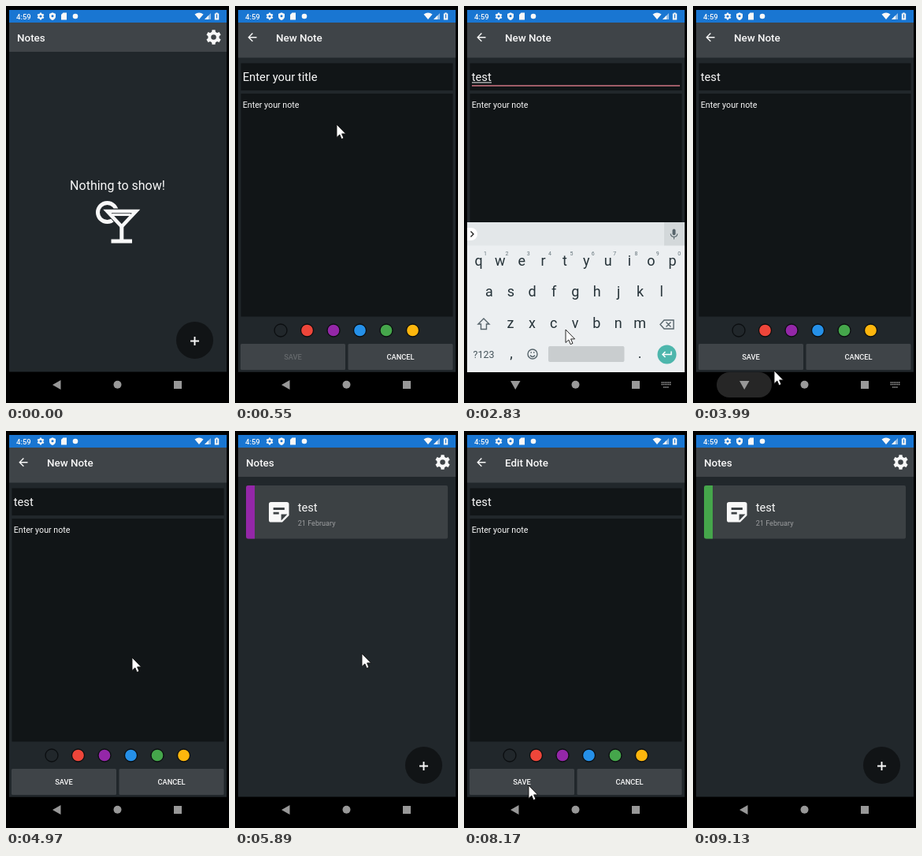
Recreate the animation shown at these times as an HTML page. Size 283 by 503 pixels, loop 9.38 s.

```html
<!DOCTYPE html>
<html lang="en">
<head>
<meta charset="utf-8">
<title>Notes app</title>
<style>
html, body { margin: 0; width: 100%; height: 100%; overflow: hidden; background: #000; }
svg { display: block; width: 100vw; height: 100vh; font-family: Roboto, sans-serif; fill: #f8f8f8; }
.bold { font-weight: 500; }
.mid { text-anchor: middle; }
.field { fill: #111517; }
.button { fill: #3f4448; }
.fab { fill: #111416; }
.key { fill: #253238; font-size: 18px; text-anchor: middle; }
.hint { fill: #66757c; font-size: 7px; text-anchor: middle; }
.line { fill: none; stroke: #56646b; stroke-width: 1.4; }
</style>
</head>
<body>
<svg viewBox="0 0 283 503">
  <defs>
    <g id="gear">
      <circle r="5.2" fill="none" stroke="#f8f8f8" stroke-width="3.8"/>
      <path id="tooth" d="M-2.5-6 -2-9.3H2L2.5-6Z"/>
      <use href="#tooth" transform="rotate(60)"/><use href="#tooth" transform="rotate(120)"/>
      <use href="#tooth" transform="rotate(180)"/><use href="#tooth" transform="rotate(240)"/>
      <use href="#tooth" transform="rotate(300)"/>
    </g>
  </defs>
  <rect width="283" height="503" fill="#000"/>
  <rect x="4" y="5" width="276" height="458.500" fill="#21272b"/>

  <g id="statusBar">
    <rect x="4" y="5" width="276" height="16" fill="#1976d2"/>
    <text x="13" y="16.500" font-size="9.5" class="bold">4:59</text>
    <use href="#gear" transform="translate(44 13) scale(.48)"/>
    <path d="M59 8.300 63 10V13Q63 16.500 59 18 55 16.500 55 13V10Z"/>
    <circle cx="59" cy="12.800" r="1.500" fill="#1976d2"/>
    <path d="M72.500 8.500H77V17.500H70V11Z"/>
    <circle cx="88" cy="13" r="3.300"/>
    <path d="M239.500 10.500Q245 6.500 250.500 10.500L245 17Z"/>
    <path d="M252 17 260 9V17Z" opacity=".55"/><path d="M252 17 257 12V17Z"/>
    <path d="M264.800 9.500H266.300V8.500H268.700V9.500H270.200V17.500H264.800Z"/>
    <path d="M267.500 10.500V15.500" stroke="#1976d2" stroke-width="1.200"/>
  </g>

  <rect x="4" y="21" width="276" height="37" fill="#3f4448"/>
  <g id="homeHeader">
    <text x="14" y="45" font-size="13.400" class="bold">Notes</text>
    <use href="#gear" x="263.500" y="39.500"/>
  </g>
  <g id="formHeader">
    <path transform="translate(13.500 31.300) scale(.7)" d="M20 11H7.830l5.590-5.590L12 4l-8 8 8 8 1.410-1.410L7.830 13H20Z"/>
    <text id="heading" x="52" y="45" font-size="13.400" class="bold"></text>
  </g>

  <g id="empty">
    <text x="141.500" y="233" font-size="16" class="mid">Nothing to show!</text>
    <circle cx="128.500" cy="261.500" r="12" fill="none" stroke="#f8f8f8" stroke-width="5"/>
    <path d="M125 258H169L147 283Z" fill="#21272b" stroke="#21272b" stroke-width="3"/>
    <path d="M128.500 260H165L146.800 279.500Z" fill="none" stroke="#f8f8f8" stroke-width="4.600"/>
    <path d="M135 264.500H158" stroke="#f8f8f8" stroke-width="3"/>
    <path d="M146.800 279V298M133.500 298H160" stroke="#f8f8f8" stroke-width="5"/>
  </g>

  <g id="card">
    <rect x="14" y="69" width="256" height="67.500" rx="2" fill="#3c4144"/>
    <path id="stripe" d="M25 69V136.500H17Q14 136.500 14 133.500V72Q14 69 17 69Z"/>
    <path transform="translate(38.700 85.700) scale(1.420)" d="M19 3H5Q3 3 3 5V19Q3 21 5 21H15l6-6V5Q21 3 19 3ZM7 8h10v2H7Zm5 6H7v-2h5Zm2 5.500V14h5.500Z"/>
    <text x="79.700" y="102" font-size="14.700">test</text>
    <text x="79.700" y="120" font-size="9.100" fill="#9b9d9f">21 February</text>
    <rect id="selection" x="12.200" y="66.800" width="259.500" height="71" fill="none" stroke="#dc720f" stroke-width="3.500"/>
  </g>

  <g id="fabs">
    <g id="editFab">
      <circle cx="239.500" cy="365.500" r="23.500" class="fab"/>
      <circle id="editRipple" cx="239.500" cy="365.500" r="23.500" opacity=".16"/>
      <path transform="translate(230.800 357) scale(.72)" d="M3 17.250V21h3.750L17.810 9.940l-3.750-3.750ZM20.710 7.040q.7-.7 0-1.410l-2.340-2.340q-.7-.7-1.410 0l-1.830 1.830 3.750 3.750Z"/>
    </g>
    <circle cx="239.500" cy="423.500" r="23.500" class="fab"/>
    <circle id="addRipple" cx="239.500" cy="423.500" r="23.500" opacity=".12"/>
    <path d="M234 424.500H245M239.500 419V430" stroke="#f8f8f8" stroke-width="1.900"/>
  </g>

  <g id="form">
    <rect x="4" y="58" width="276" height="405.500" fill="#21272b"/>
    <rect x="4" y="57.500" width="276" height="8" fill="#3f4448"/>
    <rect x="7.500" y="72.500" width="269" height="34.500" class="field"/>
    <rect x="7.500" y="111" width="269" height="282.500" class="field"/>
    <text id="title" x="9.700" y="95" font-size="14.800"></text>
    <path id="composing" d="M10 97H35" stroke="#f8f8f8"/>
    <path id="focusLine" d="M10 101H274" stroke="#cf7482" stroke-width="1.300"/>
    <path id="caret" d="M35.500 79V99" stroke="#cf7482" stroke-width="1.400"/>
    <text x="9.700" y="129" font-size="10.700">Enter your note</text>
    <g id="swatches" stroke="#0b0e10" stroke-width="1.300"></g>
    <rect x="7" y="428" width="133" height="33" rx="1.500" class="button"/>
    <rect id="saveRipple" x="7" y="428" width="133" height="33" rx="1.500" opacity=".15"/>
    <rect x="143.500" y="428" width="133" height="33" rx="1.500" class="button"/>
    <text id="save" x="73.500" y="448" font-size="9.300" class="bold mid">SAVE</text>
    <text x="210" y="448" font-size="9.300" class="bold mid">CANCEL</text>
  </g>

  <g id="keyboard">
    <rect x="4" y="274" width="276" height="190" fill="#eceff1"/>
    <rect x="4" y="274" width="276" height="29.500" fill="#e3e7e9"/>
    <rect x="254" y="274" width="26" height="29.500" fill="#d3d8da"/>
    <path d="M4 281H9A8 8 0 0 1 9 297H4Z" fill="#fff"/>
    <path d="M8.500 285.500 12 289 8.500 292.500" class="line" style="stroke:#222"/>
    <rect x="264.500" y="282.500" width="4" height="8" rx="2" fill="#56646b"/>
    <path d="M262.200 288.500Q262.500 292.500 266.500 292.500T270.800 288.500M266.500 292.500V295.500" class="line" style="stroke-width:1.100"/>
    <path d="M25 396 32 403H28.500V409.500H21.500V403H18Z" class="line"/>
    <path d="M254 398H266V409H254L249 403.500ZM256.500 400.500 262.500 406.500M262.500 400.500 256.500 406.500" class="line"/>
    <circle cx="87" cy="441" r="6" class="line"/>
    <path d="M84 442.500Q87 446.500 90 442.500M84.500 439H86M88 439H89.500" class="line"/>
    <rect x="107" y="431" width="96.500" height="20" rx="2" fill="#c9cdcf"/>
    <text x="25" y="445.500" class="key" style="font-size:12.500px;fill:#45545b">?123</text>
    <text x="60" y="446" class="key">,</text>
    <text x="223" y="446" class="key">.</text>
    <circle cx="257.500" cy="441.500" r="12" fill="#4db6ac"/>
    <path d="M263 437.500V441.500H252.500M255.500 438 252 441.500 255.500 445" fill="none" stroke="#fff" stroke-width="1.500"/>
  </g>

  <g id="navBar" fill="#989898">
    <rect id="navRipple" x="30" y="464" width="70" height="32" rx="16" fill="#262626"/>
    <path id="navBack" d="M59 480 69.500 474V486Z"/>
    <path id="navDown" d="M59 475H71.500L65.200 486Z"/>
    <circle cx="141.500" cy="479.800" r="5"/>
    <rect x="213" y="475" width="10" height="10"/>
    <path id="navKeys" d="M250.500 477H262.500M250.500 479.500H262.500M253 483H260" stroke="#989898" stroke-width="1.400" stroke-dasharray="1.500 .6"/>
  </g>
  <path id="pointer" d="M0 0V16.500L3.800 13 6.200 18.600 9 17.400 6.600 11.900H11.600Z" fill="#fff" stroke="#111" stroke-width=".9"/>
</svg>
<script>
const LOOP = 9380;
const PURPLE = '#9427a8', GREEN = '#45a64b';
const el = {};
document.querySelectorAll('[id]').forEach(node => el[node.id] = node);

// Swatches and letter keys
['#21272b', '#ee463a', PURPLE, '#2590e8', GREEN, '#fdb60d'].forEach((color, i) => {
  el.swatches.innerHTML += `<circle cx="${58 + 33.5 * i}" cy="411" r="8" fill="${color}"/>`;
});
[['qwertyuiop', 18.5, 329], ['asdfghjkl', 32, 368], ['zxcvbnm', 59, 408]].forEach(([letters, x0, y], row) => {
  [...letters].forEach((letter, i) => {
    const x = x0 + 27.35 * i;
    el.keyboard.innerHTML += `<text x="${x}" y="${y}" class="key">${letter}</text>`;
    if (!row) el.keyboard.innerHTML += `<text x="${x + 8.5}" y="315.500" class="hint">${(i + 1) % 10}</text>`;
  });
});

// [time, x, y, glide]: without glide the pointer holds, then jumps
const path = [
  [20, 205, 492], [300, 237, 423, 1], [550, 129, 150], [720, 129, 150], [960, 100, 90, 1],
  [2210, 100, 90], [2400, 131, 270, 1], [2580, 129, 410, 1], [3030, 223, 400], [3340, 223, 400],
  [3520, 255, 474, 1], [3760, 66, 475, 1], [3900, 66, 475], [3990, 103, 462, 1], [4220, 123, 409, 1],
  [4630, 110, 425], [4740, 80, 447, 1], [4970, 160, 287], [5200, 161, 282], [6170, 161, 282],
  [6380, 150, 110, 1], [6560, 150, 110], [6830, 234, 362, 1], [7270, 160, 269], [7720, 160, 269],
  [7920, 191, 410, 1], [7990, 191, 410], [8170, 82, 449, 1], [8360, 82, 449], [8450, 153, 266],
  [8890, 154, 260], [9130, 225, 504, 1]
];

const within = (t, from, to) => t >= from && t < to;
const ramp = (t, from, to) => Math.min(1, Math.max(0, (t - from) / (to - from)));
const show = (id, visible) => el[id].style.display = visible ? '' : 'none';

function placePointer(t) {
  show('pointer', within(t, 20, 9130));
  const next = path.findIndex(point => point[0] > t);
  if (next < 1) return;
  const [t0, x0, y0] = path[next - 1], [t1, x1, y1, glide] = path[next];
  const p = glide ? ramp(t, t0, t1) : 0, ease = p * p * (3 - 2 * p);
  el.pointer.setAttribute('transform', `translate(${x0 + (x1 - x0) * ease} ${y0 + (y1 - y0) * ease})`);
}

function draw(t) {
  const creating = within(t, 360, 5870), editing = within(t, 7270, 8590);
  show('homeHeader', !creating && !editing);
  show('formHeader', creating || editing);
  el.heading.textContent = creating ? 'New Note' : 'Edit Note';

  show('empty', t < 550);
  show('card', t >= 5870);
  el.stripe.setAttribute('fill', t < 8000 ? PURPLE : GREEN);
  show('selection', within(t, 6540, 7720));
  show('addRipple', within(t, 300, 550));
  show('editFab', within(t, 6580, 7720));
  show('editRipple', within(t, 7000, 7270));
  const rise = ramp(t, 6580, 6800);
  el.editFab.setAttribute('transform', `translate(0 ${58 * (1 - rise) ** 2})`);

  show('form', within(t, 550, 5870) || within(t, 7520, 8660));
  el.form.style.opacity = t < 5380 ? 1 : t < 5870 ? .5 : t < 7720 ? .7 : 1 - ramp(t, 8590, 8660);
  el.title.textContent = t < 1000 ? 'Enter your title' : t < 1370 ? 't' : 'test';
  show('focusLine', within(t, 960, 3940));
  show('composing', within(t, 1370, 3940));
  show('caret', within(t, 1370, 3940) && (t < 2210 || Math.floor((t - 1030) / 500) % 2 === 0));
  el.save.style.opacity = t < 1000 ? .2 : 1;
  show('saveRipple', within(t, 4740, 4970) || within(t, 8360, 8450));

  show('keyboard', within(t, 2830, 3940));
  const typing = within(t, 1370, 4300);
  show('navDown', typing);
  show('navKeys', typing);
  show('navBack', !typing);
  el.navRipple.style.opacity = t < 3900 ? 0 : 1 - ramp(t, 4000, 4400);
  placePointer(t);
}

function tick() {
  draw(performance.now() % LOOP);
  requestAnimationFrame(tick);
}
tick();
</script>
</body>
</html>
```
